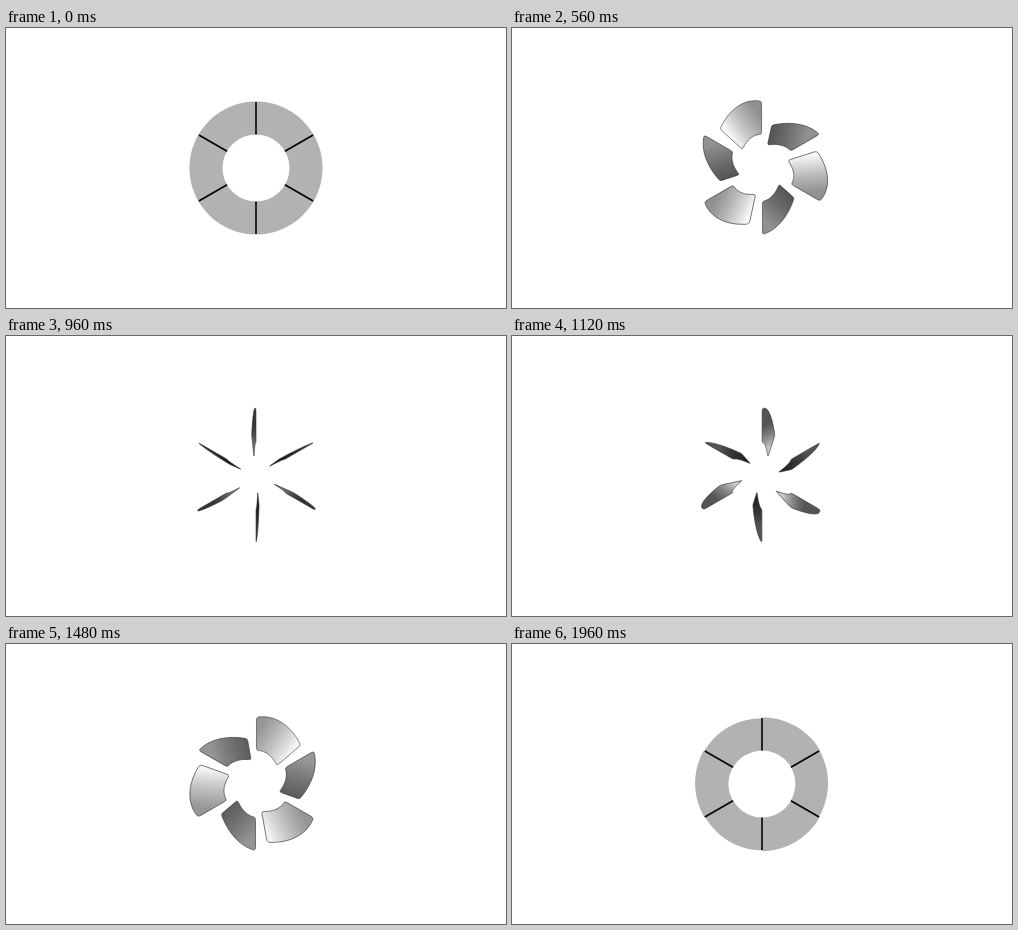
An HTML page for the animation above (2000 ms loop, 500 px wide and 280 px high).

```html
<!DOCTYPE html>
<html lang="en">
<head>
<meta charset="utf-8">
<title>Folding ring</title>
<style>
html, body { margin: 0; width: 100%; height: 100%; overflow: hidden; background: #fff; }
svg { display: block; width: 500px; height: 280px; }
</style>
</head>
<body>
<svg id="stage" viewBox="0 0 500 280"></svg>
<script>
const OUTER = 66.5, INNER = 33.4, SPAN = Math.PI / 3, CORNER = 3, GAP = 0.7;
const CAMERA = 330, GREY = 178;
const LOOP = 2000, STEP = 40;
const stage = document.getElementById('stage');

function add(parent, tag, attrs = {}) {
  const node = document.createElementNS('http://www.w3.org/2000/svg', tag);
  return set(parent.appendChild(node), attrs);
}
function set(node, attrs) {
  for (const key in attrs) node.setAttribute(key, attrs[key]);
  return node;
}

// Flat sector: x runs along the hinge, y away from it.
const polar = (r, a) => [r * Math.cos(a), r * Math.sin(a)];
function arc(r, from, to, n = 20) {
  return Array.from({ length: n + 1 }, (_, i) => polar(r, from + (to - from) * i / n));
}
function bend(a, b, c) {
  return [0, 0.25, 0.5, 0.75, 1].map(t => [0, 1].map(i =>
    (1 - t) ** 2 * a[i] + 2 * t * (1 - t) * b[i] + t * t * c[i]));
}
function sector(corner, gap) {
  const near = r => polar(r, Math.asin(gap / r));
  const far = r => polar(r, SPAN - Math.asin(gap / r));
  const outer = (corner + gap) / OUTER, inner = (corner + gap) / INNER;
  return [
    ...bend(near(OUTER - corner), near(OUTER), polar(OUTER, outer)),
    ...arc(OUTER, outer, SPAN - outer),
    ...bend(polar(OUTER, SPAN - outer), far(OUTER), far(OUTER - corner)),
    ...bend(far(INNER + corner), far(INNER), polar(INNER, SPAN - inner)),
    ...arc(INNER, SPAN - inner, inner),
    ...bend(polar(INNER, inner), near(INNER), near(INNER + corner))
  ];
}
const sharp = sector(0, 0), rounded = sector(CORNER, GAP);

const defs = add(stage, 'defs');
const seams = add(stage, 'g', { stroke: '#000', 'stroke-width': 1.6 });
const blades = Array.from({ length: 6 }, (_, i) => {
  const transform = `translate(250 140) rotate(${i * 60 - 30})`;
  const fill = add(defs, 'linearGradient', { id: 'shade' + i, gradientUnits: 'userSpaceOnUse' });
  const stops = [0, 1, 2, 3, 4].map(s => add(fill, 'stop', { offset: s / 4 }));
  const path = add(stage, 'path', {
    fill: `url(#shade${i})`, 'stroke-linejoin': 'round', 'stroke-width': 0.6, transform
  });
  add(seams, 'line', { x1: INNER, x2: OUTER - 0.5, y1: 0, y2: 0, transform });
  return { fill, stops, path, side: i % 2 ? 1 : -1 };
});
stage.append(seams);

// Odd blades lift towards the viewer and the lamp, even ones sink away.
function drawBlade({ fill, stops, path, side }, angle, flat) {
  const cos = Math.cos(angle), sin = Math.sin(angle) * side;
  const project = ([x, y]) => {
    const scale = CAMERA / (CAMERA - y * sin);
    return [x * scale, -y * cos * scale];
  };
  const outline = (flat ? sharp : rounded).map(project);
  set(path, {
    d: 'M' + outline.map(p => p.map(v => v.toFixed(2)).join()).join('L') + 'Z',
    stroke: flat ? 'none' : '#333'
  });
  const hinge = project(polar(50, 0)), edge = project(polar(50, SPAN));
  set(fill, { x1: hinge[0], y1: hinge[1], x2: edge[0], y2: edge[1] });
  const base = GREY * Math.abs(cos) ** 0.45;
  stops.forEach((stop, s) => {
    const v = Math.round(base * Math.exp(0.92 * side * sin * sin * s / 4));
    set(stop, { 'stop-color': `rgb(${v},${v},${v})` });
  });
}

function render(time) {
  const angle = Math.PI * Math.floor(time % LOOP / STEP) * STEP / LOOP;
  const flat = Math.sin(angle) < 0.1;
  blades.forEach(blade => drawBlade(blade, angle, flat));
  set(seams, { visibility: flat ? 'visible' : 'hidden' });
}

const start = performance.now();
function tick() {
  render(performance.now() - start);
  requestAnimationFrame(tick);
}
tick();
</script>
</body>
</html>
```
